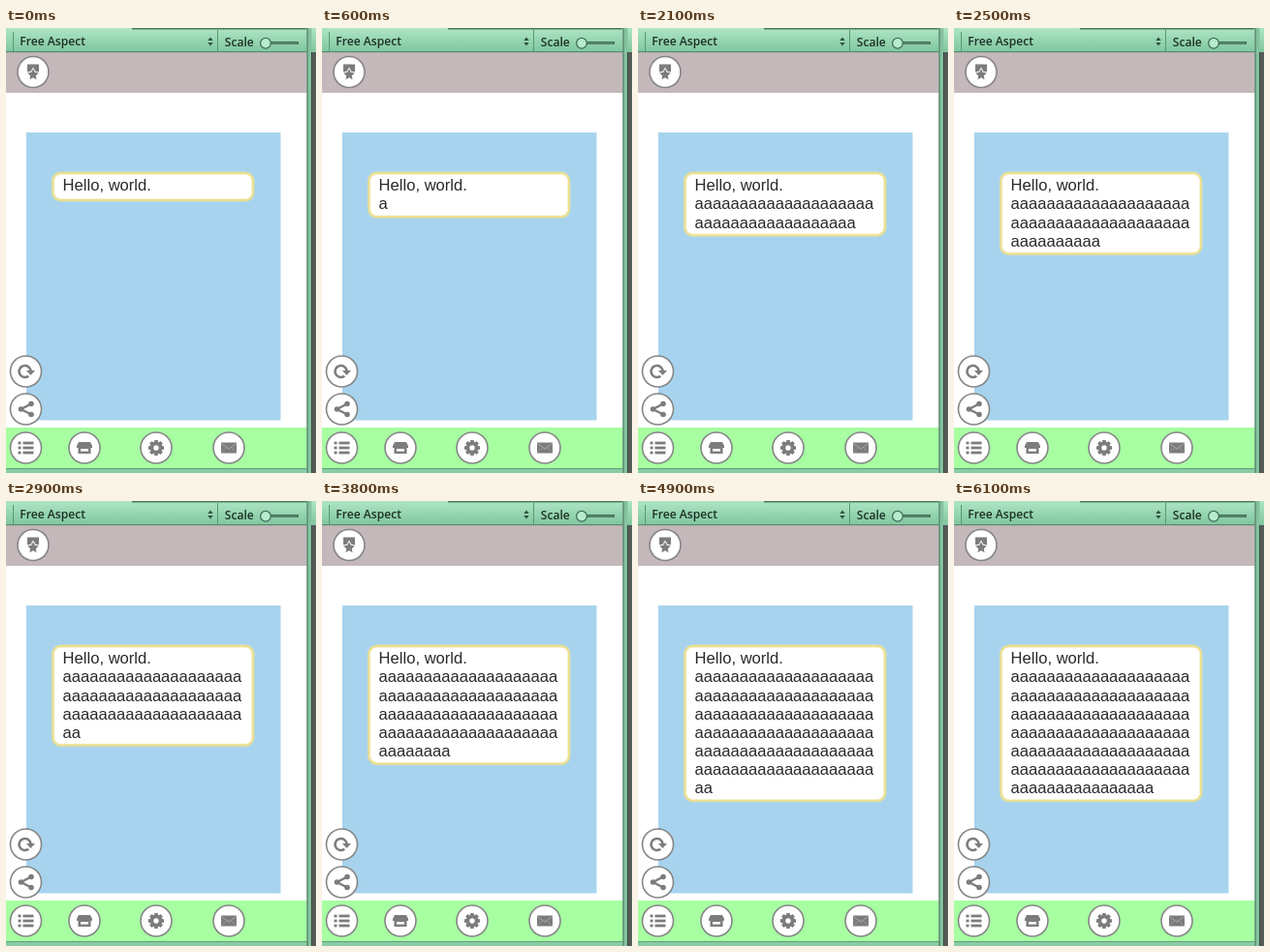
An HTML page with a canvas for the animation above (6.2 s loop, 320 by 460 pixels).

```html
<!DOCTYPE html>
<html lang="en">
<head>
<meta charset="utf-8">
<title>Growing text bubble</title>
<style>
html, body { margin: 0; width: 100%; height: 100%; overflow: hidden; background: #9ac9ae; }
canvas { display: block; width: 320px; height: 460px; filter: blur(0.4px); }
</style>
</head>
<body>
<canvas id="stage" width="320" height="460"></canvas>
<script>
const ctx = document.getElementById('stage').getContext('2d');
const LOOP = 6200, STEP = 100, PER_LINE = 20, LINE = 19.1;
const NEWLINE_AT = 300;
const GREY = '#7c7c7c';
// Typed letters over time: one key press, then key repeat until release.
const TYPING = [[450, 1], [900, 1], [1300, 13], [2100, 38], [2900, 62], [3800, 88], [4900, 122], [5360, 136]];

function rect(x, y, w, h, color) {
  ctx.fillStyle = color;
  ctx.fillRect(x, y, w, h);
}

function disc(x, y, r, color) {
  ctx.fillStyle = color;
  ctx.beginPath();
  ctx.arc(x, y, r, 0, Math.PI * 2);
  ctx.fill();
}

function poly(points, color) {
  ctx.fillStyle = color;
  ctx.beginPath();
  points.forEach(([x, y]) => ctx.lineTo(x, y));
  ctx.closePath();
  ctx.fill();
}

function line(points, color, width) {
  ctx.strokeStyle = color;
  ctx.lineWidth = width;
  ctx.beginPath();
  points.forEach(([x, y]) => ctx.lineTo(x, y));
  ctx.stroke();
}

function text(str, x, y, font, color) {
  ctx.font = font;
  ctx.fillStyle = color;
  ctx.fillText(str, x, y);
}

function gradient(y0, y1, top, bottom) {
  const g = ctx.createLinearGradient(0, y0, 0, y1);
  g.addColorStop(0, top);
  g.addColorStop(1, bottom);
  return g;
}

function star(r, inner, y, color) {
  const points = Array.from({ length: 10 }, (_, i) => {
    const a = i * Math.PI / 5 - Math.PI / 2, d = i % 2 ? inner : r;
    return [Math.cos(a) * d, y + Math.sin(a) * d];
  });
  poly(points, color);
}

const icons = {
  medal() {
    poly([[-6, -8], [6, -8], [6, 0], [0, 3], [-6, 0]], GREY);
    star(7.5, 4, 2.6, '#fff');
    star(6, 3, 2.8, GREY);
  },
  reload() {
    ctx.strokeStyle = GREY;
    ctx.lineWidth = 2.6;
    ctx.beginPath();
    ctx.arc(-1, 0, 6, 0.9, Math.PI * 2);
    ctx.stroke();
    poly([[0.5, -1], [9.5, -1], [5, 4]], GREY);
  },
  share() {
    const nodes = [[5.5, -5.5], [-5, 0], [5.5, 5.5]];
    line(nodes, GREY, 2.4);
    nodes.forEach(([x, y]) => disc(x, y, 2.8, GREY));
  },
  list() {
    [-5, 0, 5].forEach(y => {
      rect(-8, y - 1.4, 3, 2.8, GREY);
      rect(-3, y - 1.4, 11, 2.8, GREY);
    });
  },
  shop() {
    poly([[-6, -6], [6, -6], [8, -2], [8, 0], [-8, 0], [-8, -2]], GREY);
    rect(-6.5, 0, 13, 6, GREY);
    rect(-4, 1, 8, 2.6, '#fff');
  },
  gear() {
    for (let i = 0; i < 8; i++) {
      ctx.save();
      ctx.rotate(i * Math.PI / 4);
      rect(-1.8, -8, 3.6, 5, GREY);
      ctx.restore();
    }
    disc(0, 0, 6.4, GREY);
    disc(0, 0, 2.7, '#fff');
  },
  mail() {
    rect(-8, -5.5, 16, 11, GREY);
    line([[-8, -4.5], [0, 1], [8, -4.5]], '#aaa', 1);
    line([[-8, 5], [-2.5, 0]], '#999', 0.8);
    line([[8, 5], [2.5, 0]], '#999', 0.8);
  }
};

function button(name, x, y) {
  disc(x, y, 16.8, '#858585');
  disc(x, y, 15.2, '#fff');
  ctx.save();
  ctx.translate(x, y);
  icons[name]();
  ctx.restore();
}

function drawToolbar() {
  const font = '600 12.1px "Open Sans", "Noto Sans", sans-serif';
  const ink = '#1c3026';
  rect(0, 0, 320, 25, gradient(0, 25, '#aee5c5', '#7fc69e'));
  rect(130, 0, 180, 1.5, '#4a7a60');
  rect(0, 24, 311, 1.2, '#558c6c');
  rect(7, 4, 1, 20, '#5a9675');
  rect(218, 2, 1, 22, '#5a9675');
  text('Free Aspect', 14.3, 17.5, font, ink);
  text('Scale', 225.8, 19, font, ink);
  poly([[208.3, 13], [213.7, 13], [211, 9.5]], '#2c513d');
  poly([[208.3, 15], [213.7, 15], [211, 18.5]], '#2c513d');
  line([[273, 15.5], [302, 15.5]], '#416c55', 3);
  line([[274, 15.8], [301, 15.8]], '#6a9f81', 1);
  disc(268, 15.7, 6, '#41705a');
  disc(268, 15.7, 4.7, '#b9ebcd');
}

function drawScene() {
  rect(0, 0, 320, 460, '#fff');
  rect(0, 25, 311, 42, '#c4b8ba');
  rect(21, 108, 262.5, 297.5, '#a7d3ee');
  rect(0, 413, 311, 42, '#a7ffa2');
  rect(0, 455, 311, 5, '#8acba6');
  rect(0, 455, 311, 1, '#5f9f7b');
  drawToolbar();
  rect(310.5, 0, 5, 460, '#84c29f');
  rect(310.5, 0, 1.2, 460, '#55806a');
  rect(315.5, 25, 4.5, 435, '#555b57');
  rect(315, 25, 1, 435, '#3f4c44');
  button('medal', 28, 45.5);
  button('reload', 20.5, 355);
  button('share', 20.5, 394);
  button('list', 20.5, 434);
  button('shop', 81, 434);
  button('gear', 155, 434);
  button('mail', 230, 434);
}

function typedCount(t) {
  if (t < TYPING[0][0]) return 0;
  for (let i = 1; i < TYPING.length; i++) {
    const [t0, n0] = TYPING[i - 1], [t1, n1] = TYPING[i];
    if (t < t1) return Math.floor(n0 + (n1 - n0) * (t - t0) / (t1 - t0));
  }
  return TYPING[TYPING.length - 1][1];
}

function drawBubble(t) {
  const count = typedCount(t);
  const lines = ['Hello, world.'];
  for (let left = count; left > 0; left -= PER_LINE) lines.push('a'.repeat(Math.min(left, PER_LINE)));
  if (!count && t >= NEWLINE_AT) lines.push('');
  const bottom = lines.length === 1 ? 178 : 157 + LINE * lines.length;
  ctx.beginPath();
  ctx.roundRect(48.5, 150, 206.5, bottom - 150, 8);
  ctx.fillStyle = '#fff';
  ctx.fill();
  ctx.strokeStyle = 'rgba(238, 228, 160, 0.5)';
  ctx.lineWidth = 3.6;
  ctx.stroke();
  ctx.strokeStyle = '#ebdf8c';
  ctx.lineWidth = 1.8;
  ctx.stroke();
  lines.forEach((str, i) =>
    text(str, 58.6, 168.3 + i * LINE, '16.6px "Liberation Sans", Arial, sans-serif', '#2a2a2a'));
}

function render() {
  const t = Math.floor(performance.now() % LOOP / STEP) * STEP;
  drawScene();
  drawBubble(t);
  requestAnimationFrame(render);
}
render();
</script>
</body>
</html>
```
